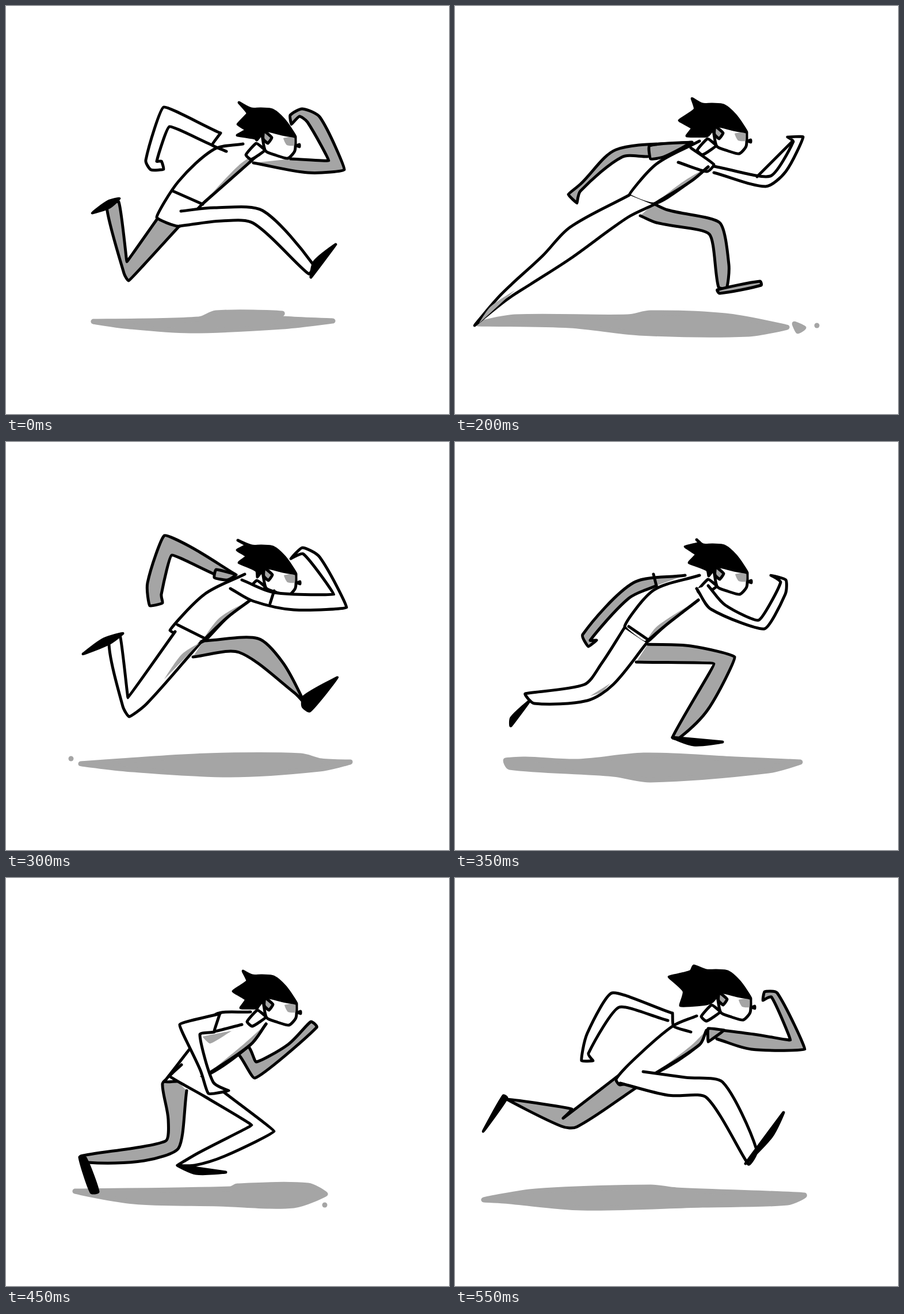
An HTML page for the animation above (600 ms loop, 770 by 710 pixels).

```html
<!DOCTYPE html>
<html lang="en">
<head>
<meta charset="utf-8">
<title>Run cycle</title>
<style>
html, body { margin: 0; width: 100%; height: 100%; overflow: hidden; background: #fff; }
#stage { position: relative; width: 770px; height: 710px; overflow: hidden; }
#strip { position: absolute; left: 0; top: 0; width: 9240px; height: 710px; animation: run 600ms steps(12) infinite; }
@keyframes run { to { transform: translateX(-9240px); } }
path { fill: none; stroke: #000; stroke-width: 5; stroke-linecap: round; stroke-linejoin: round; }
.far { --skin: #a5a5a5; }
.near { --skin: #fff; }
.f { fill: var(--skin); }
.w, .c { fill: #fff; }
.g { fill: #a5a5a5; }
.s { fill: #a5a5a5; stroke: none; }
.b { fill: #000; }
.h { fill: #a5a5a5; stroke: #a5a5a5; stroke-width: 9; }
</style>
</head>
<body>
<div id="stage"><svg id="strip" viewBox="0 0 9240 710"></svg></div>
<script>
// A shape is a style letter and its points; legs and arms are [far, near].
const leap = {
  shadow: "h 152 549 335 545 365 534 480 535 470 543 568 548 480 558 320 565 206 557",
  legs: ["f 303 381 240 450 213 478 205 465 175 349 196 341 210 445 266 366|b 150 360 178 340 197 335 180 350",
    "f 304 357 362 351 446 356 534 450 526 466 430 378 375 374 302 383|b 530 472 536 445 573 415"],
  arms: ["f 430 273 525 290 588 285 546 194 515 179 494 190 496 206 510 192 524 202 561 269 495 266",
    "f 370 220 274 176 243 268 252 285 274 284 270 270 262 270 284 210 360 243|l 373 221 358 242 383 253"],
  torso: "w 412 240 362 249 300 305 262 368 302 383 342 344 420 275 447 250|l 290 322 342 345",
  nose: [508, 243],
  hair: "-103 -75 -105 -37 -106 -18"
};

const crouch = {
  shadow: "h 132 541 150 530 285 537 440 531 523 528 550 537 472 558 360 558 172 555",
  legs: ["f 281 375 293 446 182 407 174 424 260 463 306 489 316 385|g 182 404 137 448 133 463 162 445",
    "f 330 350 335 360 432 387 335 531 298 533 388 402 276 382 280 350 299 322|c 290 533 384 538 370 545 295 541"],
  arms: ["f 372 250 408 300 396 327 490 337 508 344 510 325 424 310 428 285",
    "f 357 240 289 312 335 313 428 290 437 265 400 285 322 294 370 262|l 355 243 368 262 404 255"],
  torso: "w 428 232 357 240 300 316 340 346 390 300 452 254|s 303 317 390 300 340 345",
  nose: [512, 238],
  hair: "-104 -70 -114 -48 -107 -26"
};

const push = {
  shadow: "h 40 553 105 541 300 541 340 534 470 539 577 559 510 571 320 569 200 556|h 590 553 606 560 596 566|h 629 556 629 556",
  legs: ["f 345 344 370 355 460 377 476 450 472 491 458 489 442 397 350 377 322 365|g 456 494 530 479 532 486 460 500",
    "f 303 329 200 385 152 435 80 502 34 556 90 511 130 485 200 440 300 368 345 346|s 104 495 62 523 42 552"],
  arms: ["f 412 237 280 250 218 310 197 328 212 343 218 322 290 263 335 262|g 412 237 338 243 340 266 364 262",
    "f 450 279 548 296 588 236 578 228 605 228 575 288 540 314 450 290|l 525 297 586 236|l 388 272 438 288 450 276 410 247"],
  torso: "w 425 235 350 275 303 329 347 344 410 305 440 280",
  nose: [512, 235],
  hair: "-100 -74 -122 -36 -109 -9"
};

const leap2 = {
  shadow: "h 130 560 200 555 350 546 512 546 548 555 598 557 545 569 390 579 220 570|h 113 551 113 551",
  legs: ["f 343 346 438 342 482 385 519 455 502 437 405 366 325 374|b 516 460 518 443 576 410 528 468",
    "f 294 330 212 445 198 336 179 352 203 460 214 478 245 455 340 347|b 134 369 170 343 203 333 180 350|s 336 350 275 413 305 370"],
  arms: ["f 398 230 320 182 275 163 246 245 250 285 272 280 270 265 288 197 362 230|g 400 231 365 222 362 236 385 240",
    "f 410 240 466 262 570 265 517 195 495 203 515 184 545 200 592 288 500 292 430 277 390 255|l 466 259 459 281"],
  torso: "w 415 230 345 265 285 328 340 348 385 305 425 275|l 298 318 344 341",
  nose: [509, 245],
  hair: "-106 -74 -107 -57 -104 -35"
};

const reach = {
  shadow: "h 88 554 122 552 215 556 330 545 487 552 600 557 545 572 340 588 275 578 95 566",
  legs: ["f 335 352 410 355 486 374 440 465 390 515 378 514 450 386 315 383|b 378 514 465 522 415 527",
    "f 294 324 255 385 225 422 122 438 138 455 230 450 275 422 333 350|b 130 450 98 480 97 494|s 235 442 270 420 255 435"],
  arms: ["f 400 232 310 245 222 335 232 356 246 345 235 345 302 272 350 250|l 345 230 350 250",
    "f 440 250 470 284 528 310 566 244 549 232 575 240 574 265 538 325 445 291 420 255"],
  torso: "w 425 232 345 258 295 321 331 349 365 320 423 275|l 302 321 337 345",
  nose: [513, 243],
  hair: "-93 -73 -113 -61 -106 -33"
};

const dip = {
  shadow: "h 120 545 390 541 402 536 525 535 555 550 500 570 370 567 222 563|h 554 569 554 569",
  legs: ["f 288 343 272 358 282 420 277 458 130 484 142 495 240 492 300 470 314 370|b 128 486 138 487 160 546 148 547",
    "f 370 366 466 441 380 484 328 500 298 500 335 478 427 430 345 380 285 345 305 325|b 298 500 382 512 330 514"],
  arms: ["f 395 245 425 299 435 320 490 290 530 250 540 260 433 348 408 312 372 262",
    "f 372 236 302 255 338 335 352 375 387 370 360 355 337 272 362 268|l 372 235 362 267 410 255"],
  torso: "w 425 233 365 237 325 290 275 355 345 345 425 290 452 254|s 342 276 392 266 355 288",
  nose: [510, 234],
  hair: "-98 -72 -115 -37 -102 -8"
};

const stride = {
  shadow: "h 50 560 140 545 340 538 385 543 607 552 578 565 430 569 220 574 85 562",
  legs: ["f 298 333 188 418 203 402 88 384 185 432 212 433 315 365|b 84 379 90 383 49 441",
    "f 327 337 400 347 465 355 524 472 510 498 437 382 370 378 287 357|b 505 497 571 408 550 450"],
  arms: ["f 440 262 520 272 583 282 550 207 535 213 538 198 560 200 608 298 515 298 455 280|g 440 262 468 265 440 285",
    "f 377 235 273 200 230 270 220 318 240 318 232 305 285 225 370 248|l 378 235 380 258 410 268"],
  torso: "w 420 240 378 258 315 312 280 350 287 360 345 342 425 290 437 265",
  nose: [519, 225],
  hair: "-104 -72 -147 -53 -127 -3"
};

const pairs = s => s.trim().split(/\s+/).reduce((a, v, i) => (i % 2 ? a[a.length - 1].push(+v) : a.push([+v]), a), []);

// Smooth line through the points: gentle bends are rounded, tight corners stay sharp.
function curve(pts, closed) {
  const n = pts.length, at = i => closed ? pts[(i + n) % n] : pts[Math.max(0, Math.min(n - 1, i))];
  const dist = (a, b) => Math.hypot(b[0] - a[0], b[1] - a[1]);
  const handle = (i, len) => {
    const a = at(i - 1), p = at(i), b = at(i + 1), chord = dist(a, b) || 1;
    const k = 0.33 * len * (chord / (dist(a, p) + dist(p, b) || 1)) ** 4 / chord;
    return [(b[0] - a[0]) * k, (b[1] - a[1]) * k];
  };
  let d = "M" + pts[0];
  for (let i = 0; i < n - !closed; i++) {
    const p = at(i), q = at(i + 1), len = dist(p, q), u = handle(i, len), v = handle(i + 1, len);
    d += `C${p[0] + u[0]} ${p[1] + u[1]} ${q[0] - v[0]} ${q[1] - v[1]} ${q}`;
  }
  return closed ? d + "Z" : d;
}

const shape = (style, pts) => `<path class="${style}" d="${curve(pts, "cgsbh".includes(style))}"/>`;
const draw = text => text.split("|").map(s => shape(s[0], pairs(s.slice(1)))).join("");
const limb = (side, text) => `<g class="${side}">${draw(text)}</g>`;

// Torso with a shaded strip along the chest.
function body(text) {
  const [hip, mid, top] = pairs(text.split("|")[0].slice(1)).slice(-3);
  const inner = [mid[0] - 14, mid[1] + 1];
  const [outline, ...rest] = text.split("|");
  return draw(outline) + shape("s", [hip, mid, top, inner]) + shape("l", [hip, mid, top]) + rest.map(draw).join("");
}

// Head coordinates are relative to the nose.
function head({ nose, hair }) {
  const tips = pairs(hair), locks = [];
  tips.forEach((t, i) => {
    const next = tips[i + 1] || [-76, -8];
    locks.push(t, [(t[0] + next[0]) / 2 + 16, (t[1] + next[1]) / 2]);
  });
  const mop = [...pairs("-5 -16 -25 -45 -45 -62 -65 -64 -82 -64"), ...locks, ...pairs("-72 -10 -58 -26 -28 -20")];
  return `<g transform="translate(${nose})">` +
    draw("c -73 -4 -91 16 -82 24 -58 8|w -63 -18 -57 9 -38 17 -18 22 -6 9 -5 -14|s -26 -13 -7 -16 -7 0 -20 -1") +
    shape("b", mop) + draw("g -60 -26 -61 -12 -53 -4 -46 -14|b -3 0 2 -2 2 2") + "</g>";
}

// The other half of the cycle swaps the left and right limbs.
const swap = p => ({ ...p, legs: [p.legs[1], p.legs[0]], arms: [p.arms[1], p.arms[0]] });

const cycle = [
  leap, swap(reach), crouch, swap(dip), push, swap(stride),
  leap2, reach, swap(crouch), dip, swap(push), stride
];

document.getElementById("strip").innerHTML = cycle.map((p, i) =>
  `<g transform="translate(${i * 770})">` +
  draw(p.shadow) + limb("far", p.arms[0]) + limb("far", p.legs[0]) +
  body(p.torso) + limb("near", p.legs[1]) + head(p) + limb("near", p.arms[1]) +
  "</g>").join("");
</script>
</body>
</html>
```
